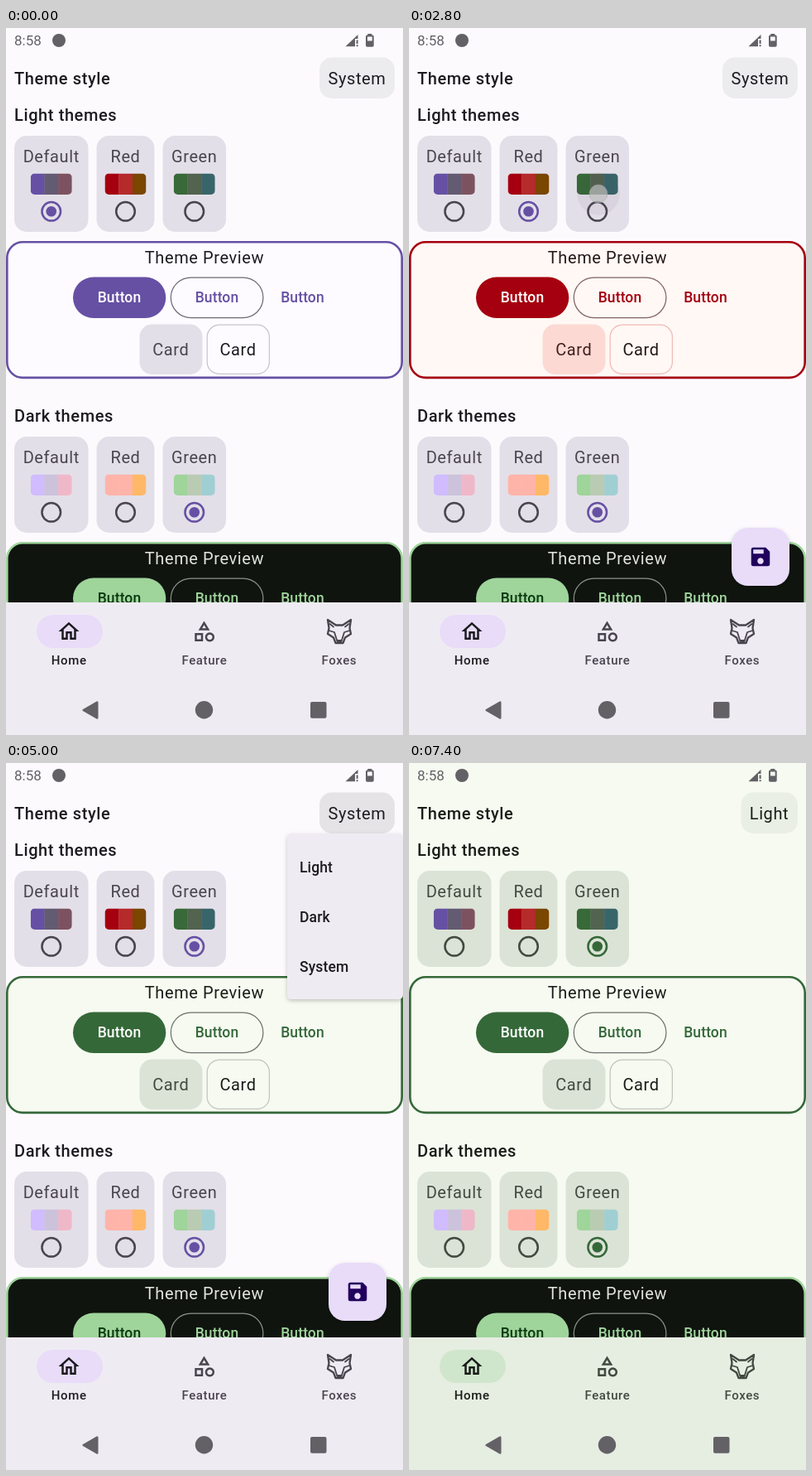
An HTML page that plays this animation: 480 px wide and 853 px high, repeating every 8000 ms.

```html
<!DOCTYPE html>
<html lang="en">
<head>
<meta charset="utf-8">
<title>Theme picker</title>
<style>
html, body { margin: 0; width: 100%; height: 100%; overflow: hidden; }
svg { display: block; width: 100vw; height: 100vh; font-family: Roboto, sans-serif; }
text { white-space: pre; }
.body { font-size: 20px; letter-spacing: .6px; }
.label { font-size: 17.5px; font-weight: 500; letter-spacing: .125px; }
.tab { font-size: 15px; font-weight: 500; letter-spacing: .6px; }
.bold { font-weight: 500; }
.mid { text-anchor: middle; }
.bg { fill: var(--bg); }
.ink { fill: var(--ink); }
.muted { fill: var(--muted); }
.accent { fill: var(--accent); }
.on { fill: var(--on); }
.card { fill: var(--card); }
.chip { fill: var(--chip); }
.nav { fill: var(--nav); }
.pill { fill: var(--pill); }
.frame { fill: var(--bg); stroke: var(--accent); stroke-width: 2.6; }
.outline { fill: none; stroke: var(--outline); stroke-width: 1.25; }
.soft { fill: none; stroke: var(--soft); stroke-width: 1.25; }
.gray { fill: #636166; }
.fox { fill: none; stroke: var(--muted); stroke-width: 2.3; stroke-linejoin: round; stroke-linecap: round; }
</style>
</head>
<body>
<svg id="stage" viewBox="0 0 480 853" preserveAspectRatio="none"></svg>
<script>
const LOOP = 8000, STEP = 100;
const stage = document.getElementById('stage');
const $ = id => document.getElementById(id);

const pageThemes = {
  violet: { bg: '#fdfafe', ink: '#1c1b1f', muted: '#49454f', accent: '#6650a4', card: '#e3dfe8',
            chip: '#ecebee', nav: '#efebf3', pill: '#e8dcf9' },
  green:  { bg: '#f6faf1', ink: '#181d17', muted: '#424940', accent: '#356839', card: '#dbe3d6',
            chip: '#e9efe5', nav: '#e6ede1', pill: '#d0e6cc' }
};
const previewThemes = [
  { bg: '#fdfbff', ink: '#1c1b1f', muted: '#49454f', accent: '#6650a4', on: '#fff',
    card: '#e3dfe8', outline: '#6f6a74', soft: '#c9c4d0' },
  { bg: '#fff8f5', ink: '#231918', muted: '#43211f', accent: '#a5000f', on: '#fff',
    card: '#fcd9d3', outline: '#7f6260', soft: '#eebbb5' },
  { bg: '#f6faf1', ink: '#181d17', muted: '#424940', accent: '#356839', on: '#fff',
    card: '#dbe3d6', outline: '#6c7369', soft: '#c0c7bb' }
];
const darkPreview = { bg: '#0f140f', ink: '#e0e4db', muted: '#c2c9bd', accent: '#9fd49b', on: '#0a390f',
  card: '#424940', outline: '#8c9388', soft: '#424940' };

const choices = [
  { name: 'Default', x: 10, w: 89.5, light: ['#6650a4', '#625b71', '#7d5260'], dark: ['#d0bcff', '#ccc2dc', '#efb8c8'] },
  { name: 'Red', x: 109.5, w: 70, light: ['#a5000f', '#b52a2a', '#7a4600'], dark: ['#ffb4a9', '#ffb4a9', '#ffb868'] },
  { name: 'Green', x: 189.5, w: 76.5, light: ['#386938', '#52634f', '#38656a'], dark: ['#9fd49b', '#bacbb3', '#a0cfd3'] }
];

const text = (s, x, y, cls, extra = '') => `<text x="${x}" y="${y}" class="${cls}" ${extra}>${s}</text>`;
const rect = (x, y, w, h, r, cls, extra = '') =>
  `<rect x="${x}" y="${y}" width="${w}" height="${h}" rx="${r}" class="${cls}" ${extra}/>`;
const icon = (d, x, y, cls, extra = '') =>
  `<path transform="translate(${x} ${y}) scale(1.25)" class="${cls}" fill-rule="evenodd" d="${d}" ${extra}/>`;

function choice(c, y, kind) {
  const mid = c.x + c.w / 2, sx = mid - 25, key = kind + c.name;
  const bars = c[kind].map((col, i) =>
    `<rect x="${sx + i * 16.67}" y="${y + 45.5}" width="${i < 2 ? 17 : 16.66}" height="25.5" fill="${col}"/>`).join('');
  return rect(c.x, y, c.w, 116, 15, 'card') +
    text(c.name, mid, y + 32, 'body muted mid') +
    `<clipPath id="clip${key}">${rect(sx, y + 45.5, 50, 25.5, 5, '')}</clipPath>
    <g clip-path="url(#clip${key})">${bars}</g>
    <circle id="ring${key}" cx="${mid}" cy="${y + 91.3}" r="11.3" fill="none" stroke-width="2.5"/>
    <circle id="dot${key}" cx="${mid}" cy="${y + 91.3}" class="accent"/>`;
}

const preview = (id, y) => `<g id="${id}" transform="translate(0 ${y})">` +
  rect(1.3, 1.3, 477.4, 163.6, 19, 'frame') +
  text('Theme Preview', 240, 27.3, 'body ink mid') +
  rect(81, 43.5, 112.3, 49.5, 24.75, 'accent') + text('Button', 137, 74.4, 'label on mid') +
  rect(199.3, 44, 111.6, 48.6, 24.3, 'outline') + text('Button', 255, 74.4, 'label accent mid') +
  text('Button', 358.5, 74.4, 'label accent mid') +
  rect(161.5, 100.5, 76, 60.5, 15, 'card') + text('Card', 199.3, 138, 'body muted mid') +
  rect(243.2, 101.2, 75.2, 59.2, 14.5, 'soft') + text('Card', 280.5, 138, 'body ink mid') + '</g>';

const ripple = (id, x, y, w, h, r, color) =>
  `<clipPath id="${id}Clip">${rect(x, y, w, h, r, '')}</clipPath>
  <g clip-path="url(#${id}Clip)"><circle id="${id}" fill="${color}" opacity="0"/></g>`;

const homePath = 'M12 5.69l5 4.5V18h-2v-6H9v6H7v-7.81l5-4.5M12 3L2 12h3v8h6v-6h2v6h6v-8h3L12 3z';
const shapesPath = 'M12 2l-5.5 9h11zM12 5.84L13.93 9h-3.87zM17.5 13a4.5 4.5 0 1 0 .01 0zM17.5 15a2.5 2.5 0 1 1-.01 0zM3 13.5h8v8H3zM5 15.5v4h4v-4z';
const savePath = 'M17 3H5a2 2 0 0 0-2 2v14a2 2 0 0 0 2 2h14a2 2 0 0 0 2-2V7zM12 13a3 3 0 1 1-.01 0zM5 5h10v4H5z';

stage.innerHTML = `
  <defs>
    <filter id="shadow" x="-20%" y="-20%" width="140%" height="150%">
      <feDropShadow dx="0" dy="2" stdDeviation="2.5" flood-opacity=".22"/>
    </filter>
  </defs>
  ${rect(0, 0, 480, 853, 0, 'bg')}
  ${text('8:58', 10, 21.3, 'gray', 'font-size="17"')}
  <circle cx="64" cy="15" r="8" class="gray"/>
  <path class="gray" d="M425.5 8V13H422V22.3H410.5Z"/>
  <path class="gray" d="M423.6 14.5h2v4.5h-2zM423.6 20.3h2v2h-2z"/>
  <path class="gray" fill-rule="evenodd" d="M437.3 8.5V7h5v1.5H443q1.7 0 1.7 1.7V21q0 1.7-1.7 1.7H436.700q-1.700 0-1.700-1.700V10.200q0-1.700 1.700-1.700zM437 10.600V15.500h5.700V10.600z"/>
  ${text('Theme style', 10, 67.5, 'body bold ink')}
  <rect id="chip" y="35.5" height="49.5" rx="15" class="chip"/>
  <text id="chipText" y="67.500" class="body ink mid"></text>
  ${ripple('ripChip', 379, 35.5, 91, 49.5, 15, '#5a3a40')}
  ${text('Light themes', 10, 112, 'body bold ink')}
  ${choices.map(c => choice(c, 130, 'light')).join('')}
  ${ripple('ripRed', 109.5, 130, 70.5, 116, 0, '#3a3048')}
  ${ripple('ripGreen', 189.5, 130, 76.5, 116, 0, '#3a3048')}
  ${preview('lightPreview', 257)}
  ${text('Dark themes', 10, 475, 'body bold ink')}
  ${choices.map(c => choice(c, 493, 'dark')).join('')}
  ${preview('darkPreview', 620)}
  <g id="fab">
    ${rect(390, 603, 70, 70, 20, '', 'fill="#e8dcf9" filter="url(#shadow)"')}
    ${icon(savePath, 410, 623, '', 'fill="#21005d"')}
    ${ripple('ripFab', 390, 603, 70, 70, 20, '#21005d')}
  </g>
  ${rect(0, 693, 480, 160, 0, 'nav')}
  ${rect(37, 708, 80, 40, 20, 'pill')}
  ${icon(homePath, 61, 713, 'ink')}
  ${icon(shapesPath, 224.5, 713, 'muted')}
  <path class="fox" d="M389 714L399 720.500H407L417 714L415.500 724L417 731L410 735.500L407.500 742H398.500L396 735.500L389 731L390.500 724Z"/>
  <path class="fox" d="M390.500 727L397 729L400.500 740M415.500 727L409 729L405.500 740M391.500 719L396 722.500M414.500 719L410 722.500" style="stroke-width:1.8"/>
  <path class="muted" d="M399.500 738h7l-2 5h-3z"/>
  ${text('Home', 76.200, 768.400, 'tab ink mid')}
  ${text('Feature', 240, 768.400, 'tab muted mid')}
  ${text('Foxes', 402.800, 768.400, 'tab muted mid')}
  <path class="gray" d="M93 822L109.500 812.600Q111.500 811.600 111.500 814V832Q111.500 834.400 109.500 833.400L93 824Q91.400 823 93 822Z"/>
  <circle cx="239.500" cy="822.800" r="10.700" class="gray"/>
  ${rect(368, 813, 19.500, 19.800, 2, 'gray')}
  <g id="menu">
    ${rect(340, 85, 140, 200, 5, '', 'fill="#efebf3" filter="url(#shadow)"')}
    ${['Light', 'Dark', 'System'].map((s, i) => text(s, 355, 131.500 + i * 60, 'label ink')).join('')}
    ${ripple('ripItem', 340, 95, 140, 60, 0, '#3a3048')}
  </g>
  <circle id="touch" r="11" fill="#bebebe" stroke="#a8a8a8" stroke-width=".8"/>`;

const clamp = v => Math.max(0, Math.min(1, v));
const ramp = (t, from, to) => clamp((t - from) / (to - from));
const easeOut = k => 1 - (1 - k) ** 3;
const setAttrs = (el, o) => { for (const k in o) el.setAttribute(k, o[k]); };
const paint = (el, theme) => { for (const k in theme) el.style.setProperty('--' + k, theme[k]); };

// Each tap holds for 200 ms, then the touch mark fades while the ripple spreads.
const taps = [
  { at: 1100, x: 147, y: 200, rip: 'ripRed', reach: 95, alpha: .1 },
  { at: 2600, x: 229, y: 200, rip: 'ripGreen', reach: 95, alpha: .1 },
  { at: 4200, x: 425, y: 63, rip: 'ripChip', reach: 65, alpha: .05 },
  { at: 5400, x: 378, y: 127, rip: 'ripItem', reach: 115, alpha: .1 },
  { at: 6900, x: 423, y: 627, rip: 'ripFab', reach: 65, alpha: .1 }
];

function setRadio(kind, i, k) {
  const key = kind + choices[i].name;
  $('dot' + key).setAttribute('r', 6.3 * k);
  $('ring' + key).style.stroke = `var(--${k > 0.3 ? 'accent' : 'muted'})`;
}

function draw(t) {
  paint(stage, t < 7300 ? pageThemes.violet : pageThemes.green);
  paint($('lightPreview'), previewThemes[t < 1300 ? 0 : t < 2800 + STEP ? 1 : 2]);

  const toRed = ramp(t, 1250, 1350), toGreen = ramp(t, 2750 + STEP, 2850 + STEP);
  [1 - toRed, toRed - toGreen, toGreen].forEach((k, i) => setRadio('light', i, k));
  choices.forEach((c, i) => setRadio('dark', i, i === 2 ? 1 : 0));

  for (const p of taps) {
    const d = t - p.at;
    const grow = easeOut(ramp(d, 150, 650));
    const fade = ramp(d, 150, 225) * (1 - ramp(d, 750, 1100));
    setAttrs($(p.rip), { cx: p.x, cy: p.y, r: p.reach * grow, opacity: p.alpha * fade });
  }
  const tap = taps.find(p => t >= p.at && t < p.at + 400);
  setAttrs($('touch'), tap
    ? { cx: tap.x, cy: tap.y, opacity: .7 * (1 - ramp(t - tap.at, 200, 400)) }
    : { opacity: 0 });

  const system = t < 5700;
  setAttrs($('chip'), system ? { x: 379, width: 91 } : { x: 401.5, width: 68.5 });
  $('chipText').setAttribute('x', system ? 424.5 : 435.5);
  $('chipText').textContent = system ? 'System' : 'Light';

  $('fab').style.display = t >= 1300 && t < 7200 ? '' : 'none';

  const scale = .8 + .2 * easeOut(ramp(t, 4460, 4580));
  setAttrs($('menu'), {
    transform: `translate(424.5 85) scale(${scale}) translate(-424.5 -85)`,
    opacity: ramp(t, 4460, 4490) * (1 - ramp(t, 5600, 5675))
  });
}

paint($('darkPreview'), darkPreview);
const start = performance.now();
function tick() {
  const t = (performance.now() - start) % LOOP;
  draw(Math.floor(t / STEP) * STEP);
  requestAnimationFrame(tick);
}
tick();
</script>
</body>
</html>
```
